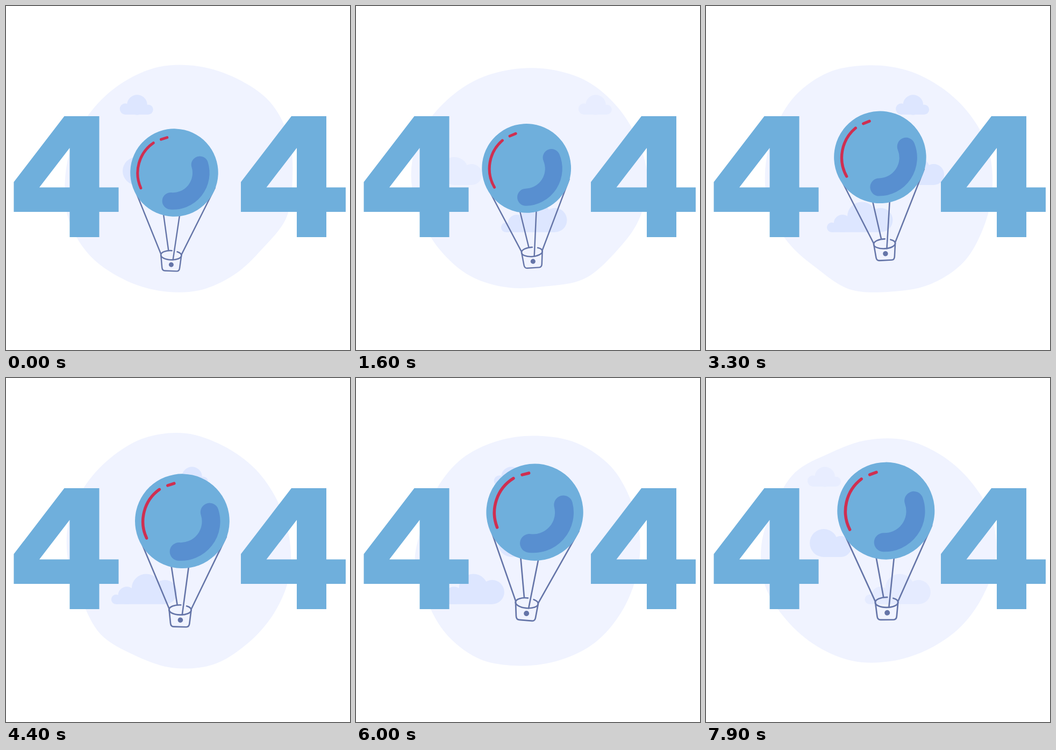
Animation of 640 by 640 pixels, one loop 8000 ms. Source, as an HTML page:

```html
<!DOCTYPE html>
<html lang="en">
<head>
<meta charset="utf-8">
<title>404</title>
<style>
  html, body { margin: 0; width: 100%; height: 100%; overflow: hidden; background: #fff; }
  svg { display: block; width: 100%; height: 100%; }
  .cloud { fill: #dde6ff; }
  .line { fill: none; stroke: #6575a8; stroke-width: 2.7; stroke-linecap: round; stroke-linejoin: round; }
  .shine { fill: none; stroke: #cf2f51; stroke-width: 5.6; stroke-linecap: round; }
  .shade { fill: none; stroke: #588fd0; stroke-width: 35; stroke-linecap: round; }
</style>
</head>
<body>
<svg viewBox="0 0 640 640" role="img" aria-label="404">
  <defs>
    <path id="four" fill="#6fafdc" fill-rule="evenodd"
      d="M108.5 205H173.5V337.5H209.5V383H173.5V430H118.5V383H14.5V327.5ZM118.5 264L62 337.5H118.5Z"/>
  </defs>
  <path id="blob" fill="#f0f3ff"/>

  <g id="topCloud" class="cloud">
    <circle cx="-22" cy="191.6" r="10.3"/>
    <circle cx="0" cy="184" r="18.8"/>
    <circle cx="20.5" cy="192.7" r="9.3"/>
    <rect x="-22" y="190" width="42.5" height="12"/>
  </g>
  <g id="midCloud" class="cloud">
    <circle cx="26" cy="307" r="26"/>
    <circle cx="58" cy="313.5" r="19.5"/>
    <rect x="26" y="310" width="32" height="23"/>
  </g>
  <g id="lowCloud" class="cloud">
    <circle cx="9" cy="411.8" r="9"/>
    <circle cx="29" cy="404.5" r="16.3"/>
    <circle cx="65" cy="391.5" r="27"/>
    <circle cx="100" cy="398.3" r="22.5"/>
    <rect x="9" y="405" width="91" height="15.8"/>
  </g>

  <use href="#four"/>
  <use href="#four" x="422.5"/>

  <g id="balloon">
    <path class="line" d="M-84 28L-21 168.5M85 28L21.2 168.5M-20 80L-5.7 160.6M15.2 80L4.2 179.6"/>
    <path class="line" d="M1.3 160.7A21.2 9.5 0 1 0 21.2 170C21.2 167 17.5 164 12.3 162.6"/>
    <path class="line" d="M-21 170L-17.8 196Q-17 202.6 -11.5 202.6H12.5Q18 202.6 18.6 196L21.2 170"/>
    <circle cx="1" cy="189.6" r="5" fill="#6575a8"/>
    <circle r="90.5" fill="#6fafdc"/>
    <path class="shade" d="M52 -18.4A58 58 0 0 1 -5 58.6"/>
    <path class="shine" d="M-45.2 -59.6A75.5 75.5 0 0 0 -67.5 34.3M-29.6 -67.5L-17.3 -71.8"/>
  </g>
</svg>
<script>
  const LOOP = 8000, STEP = 100;
  const CYCLE = 7.26;   // seconds per cloud pass and per sway
  const LIFE = 7.1;     // seconds a cloud stays visible
  const CENTER = [321.5, 321];
  const $ = id => document.getElementById(id);

  // Radii of the backdrop at even angles, joined by a smooth closed curve.
  const RADII = [211.5, 213, 203, 206.5, 211.5, 212, 214, 219, 218.5,
                 211.5, 208, 205.5, 207, 211, 212, 215, 221.5, 218.5];

  function blobPath() {
    const n = RADII.length;
    const points = RADII.map((r, i) => {
      const a = i / n * 2 * Math.PI;
      return [r * Math.cos(a), r * Math.sin(a)];
    });
    const at = i => points[(i + n) % n];
    const lean = (i, side) => at(i).map((v, k) => v + side * (at(i + 1)[k] - at(i - 1)[k]) / 6);
    const curves = points.map((_, i) => `C${lean(i, 1)} ${lean(i + 1, -1)} ${at(i + 1)}`);
    return `M${at(0)}${curves.join("")}Z`;
  }

  const clouds = [
    { el: $("topCloud"), start: 1.2, x: 460.3, speed: 35.7 },
    { el: $("midCloud"), start: 2.2, x: 406.8, speed: 37.5 },
    { el: $("lowCloud"), start: 0.1, x: 309.7, speed: 26.5 }
  ];

  function drawCloud({ el, start, x, speed }, t) {
    const age = (t - start + CYCLE) % CYCLE;
    const alpha = Math.max(0, Math.min(1, age, LIFE - age));
    el.setAttribute("transform", `translate(${x - speed * age} 0)`);
    el.setAttribute("opacity", alpha);
  }

  function drawBalloon(t) {
    const rise = (1 - Math.cos(Math.PI * t / CYCLE + 0.035)) / 2;
    const tilt = 0.22 - 4.78 * Math.cos(2 * Math.PI * (t - 2.3) / CYCLE);
    const x = 313.5 + 21.7 * rise - 0.25 * tilt;
    const y = 310.1 - 64.5 * rise;
    const scale = (81.75 + 9 * rise) / 90.5;
    $("balloon").setAttribute("transform", `translate(${x} ${y}) rotate(${tilt}) scale(${scale})`);
  }

  function draw(t) {
    $("blob").setAttribute("transform", `translate(${CENTER}) rotate(${t * 360 / 14})`);
    clouds.forEach(cloud => drawCloud(cloud, t));
    drawBalloon(t);
  }

  $("blob").setAttribute("d", blobPath());
  draw(0);
  const begin = performance.now();
  function tick() {
    const ms = (performance.now() - begin) % LOOP;
    draw(Math.floor(ms / STEP) * STEP / 1000);
    requestAnimationFrame(tick);
  }
  requestAnimationFrame(tick);
</script>
</body>
</html>
```
